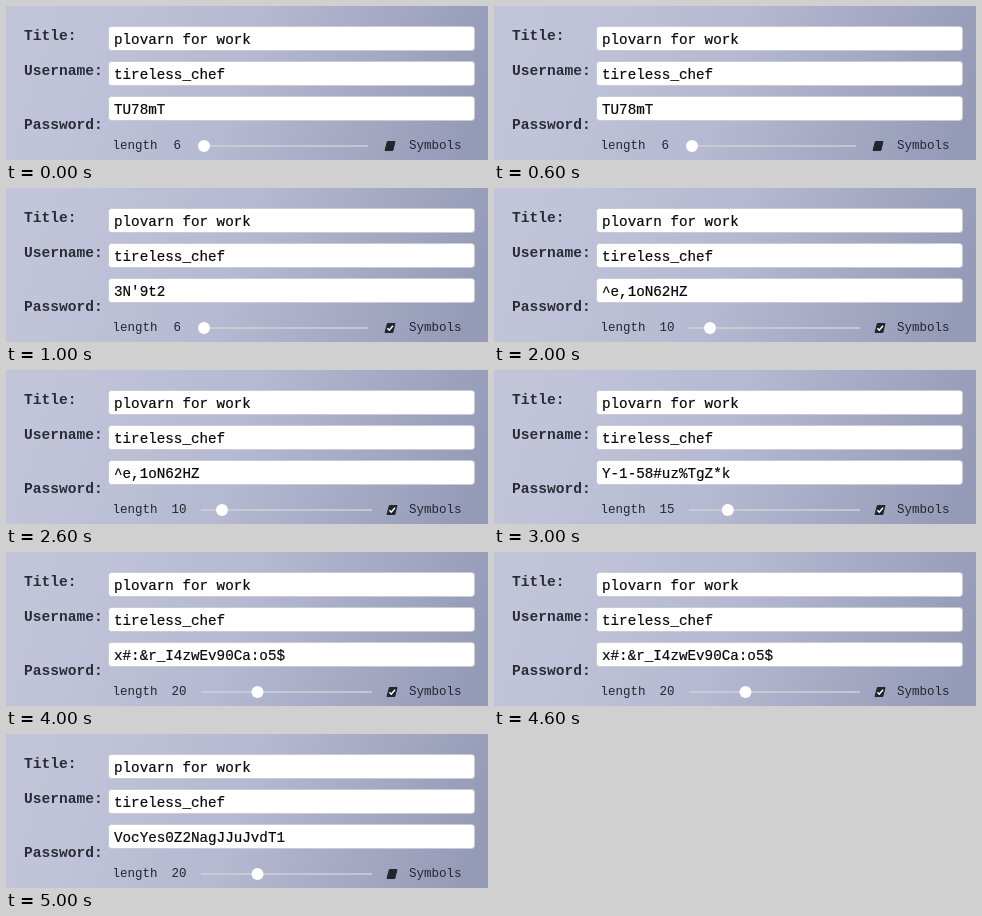
Write an HTML page that moves like this. It is 482 px wide and 154 px high and loops after 6000 ms.

```html
<!DOCTYPE html>
<html lang="en">
<head>
<meta charset="utf-8">
<title>Password form</title>
<style>
  html, body { margin: 0; width: 100%; height: 100%; overflow: hidden; }
  svg { display: block; width: 482px; height: 154px; }
  text { font-family: "Liberation Mono", "Courier New", monospace; fill: #222630; white-space: pre; }
  .label { font-size: 14.6px; font-weight: 700; fill: #292c36; }
  .value { font-size: 14.25px; fill: #08080a; stroke: #08080a; stroke-width: .2; }
  .small { font-size: 12.5px; }
  .box { fill: #fff; stroke: #c9cbd3; stroke-width: 1; }
</style>
</head>
<body>
<svg viewBox="0 0 482 154">
  <defs>
    <linearGradient id="sky" gradientUnits="userSpaceOnUse" x1="40" y1="20" x2="460" y2="150">
      <stop offset="0" stop-color="#c2c5da"/>
      <stop offset=".45" stop-color="#b5b9d1"/>
      <stop offset="1" stop-color="#959ab7"/>
    </linearGradient>
  </defs>
  <rect width="482" height="154" fill="url(#sky)"/>
  <g id="fields"></g>
  <text class="small" x="106.5" y="143">length</text>
  <text class="small" id="count" y="143"></text>
  <path id="track" stroke="#cfd0d8" stroke-width="1.5"/>
  <circle id="knob" cy="140" r="6" fill="#fff"/>
  <g id="check">
    <path d="M-2.6 -4.5H5L2.8 4.5H-5Z" fill="#24262d" stroke="#24262d" stroke-linejoin="round"/>
    <path id="tick" d="M-2.6 .2L-.7 2.2L3 -2.2" fill="none" stroke="#fff" stroke-width="1.5"/>
  </g>
  <text class="small" x="403" y="143">Symbols</text>
</svg>
<script>
const $ = id => document.getElementById(id);
const STEP = 1000;

const states = [
  { password: "TU78mT", symbols: false },
  { password: "3N'9t2", symbols: true },
  { password: "^e,1oN62HZ", symbols: true },
  { password: "Y-1-58#uz%TgZ*k", symbols: true },
  { password: "x#:&r_I4zwEv90Ca:o5$", symbols: true },
  { password: "VocYes0Z2NagJJuJvdT1", symbols: false }
];

const fields = [
  { label: "Title:", labelY: 34, top: 20, value: "plovarn for work" },
  { label: "Username:", labelY: 69, top: 55, value: "tireless_chef" },
  { label: "Password:", labelY: 123, top: 90, value: "" }
];

function add(tag, attrs, text = "") {
  const el = document.createElementNS("http://www.w3.org/2000/svg", tag);
  for (const key in attrs) el.setAttribute(key, attrs[key]);
  el.textContent = text;
  $("fields").append(el);
  return el;
}

const values = fields.map(f => {
  add("text", { class: "label", x: 18, y: f.labelY }, f.label);
  add("rect", { class: "box", x: 102.5, y: f.top + .5, width: 366, height: 24, rx: 3 });
  return add("text", { class: "value", x: 108, y: f.top + 18 }, f.value);
});
const password = values[2];

function draw(ms) {
  const { password: text, symbols } = states[Math.floor(ms / STEP) % states.length];
  const length = text.length;
  const wide = length > 9;
  const left = wide ? 195 : 192;

  password.textContent = text;
  $("count").textContent = length;
  $("count").setAttribute("x", wide ? 165.5 : 167.5);
  $("track").setAttribute("d", `M${left} 140H${wide ? 366 : 362}`);
  $("knob").setAttribute("cx", wide ? 216 + (length - 10) * 3.55 : 198);
  $("check").setAttribute("transform", `translate(${wide ? 386 : 384} 140)`);
  $("tick").setAttribute("visibility", symbols ? "visible" : "hidden");
}

const start = performance.now();
function loop() {
  draw(performance.now() - start);
  requestAnimationFrame(loop);
}
loop();
</script>
</body>
</html>
```
